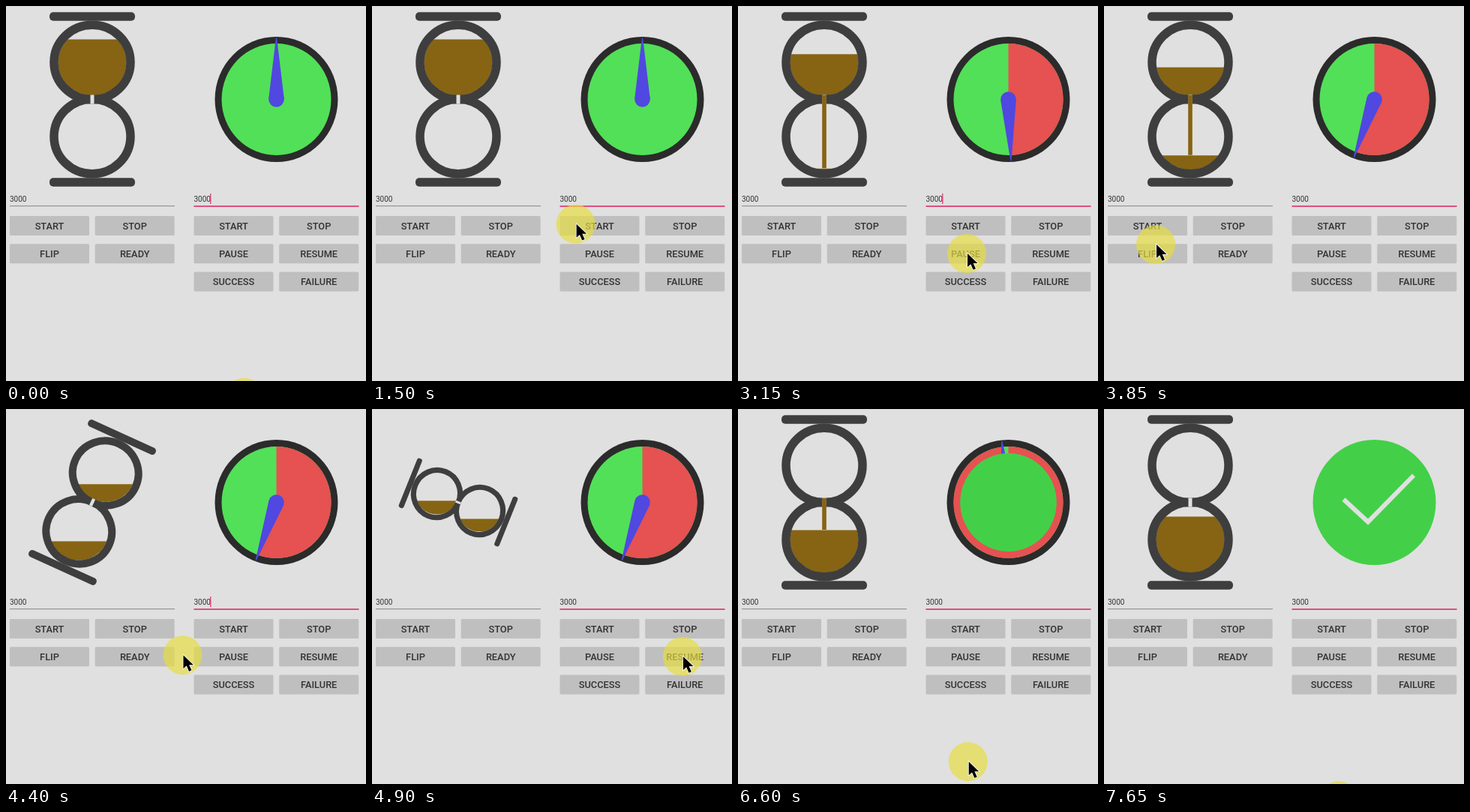
Recreate the animation shown at these times as an HTML page with a canvas. Size 480 by 500 pixels, loop 7.8 s.

```html
<!DOCTYPE html>
<html>
<head>
<meta charset="utf-8">
<style>
html, body { margin: 0; width: 100%; height: 100%; overflow: hidden; background: #e0e0e0; }
canvas { display: block; }
</style>
</head>
<body>
<canvas id="stage" width="480" height="500"></canvas>
<script>
const ctx = document.getElementById('stage').getContext('2d');
const LOOP = 7800, STEP = 50, LAST = 7650;
const BG = '#e0e0e0', FRAME = '#3e3e3e', SAND = '#866414', PINK = '#e0507f';
const TAU = Math.PI * 2;

// Timeline in ms
const DIAL_START = 1670, DIAL_PAUSE = 3332, DIAL_RESUME = 5313;
const SAND_START = 2360, FLIP_START = 4260, FLIP_TIME = 1030, SAND_RESUME = 5420;
const SUCCESS = 6250, CHECK = 6800;
const FULL = 75, RATE = FULL / 3000, FALL = 720, DROP = 99;

// Pointer path: time, x, y
const path = [
  [0, 317, 522], [150, 312, 530], [800, 190, 530], [1000, 188, 420],
  [1250, 270, 290], [1600, 272, 291], [1720, 272, 291], [2130, 38, 292],
  [2330, 45, 294], [2450, 136, 313], [2900, 305, 330], [3330, 305, 330],
  [3750, 71, 320], [3850, 69, 318], [4270, 68, 321], [4550, 443, 337],
  [4800, 414, 330], [5250, 413, 330], [5350, 385, 354], [5650, 298, 365],
  [5950, 296, 364], [6280, 296, 365], [6800, 312, 522], [7800, 313, 522]
];

const clamp = (v, lo = 0, hi = 1) => Math.min(hi, Math.max(lo, v));
const smooth = u => u * u * (3 - 2 * u);

function pointerAt(t) {
  const i = path.findIndex(p => p[0] > t);
  const [t0, x0, y0] = path[i - 1], [t1, x1, y1] = path[i];
  const u = smooth((t - t0) / (t1 - t0));
  return [x0 + (x1 - x0) * u, y0 + (y1 - y0) * u];
}

function rect(x, y, w, h, color) {
  ctx.fillStyle = color;
  ctx.fillRect(x, y, w, h);
}

function round(x, y, w, h, r, color) {
  ctx.fillStyle = color;
  ctx.beginPath();
  ctx.roundRect(x, y, w, h, r);
  ctx.fill();
}

function oval(x, y, rx, ry, color) {
  ctx.fillStyle = color;
  ctx.beginPath();
  ctx.ellipse(x, y, rx, ry, 0, 0, TAU);
  ctx.fill();
}

function text(str, x, y, font, align) {
  ctx.font = font + ' Roboto, sans-serif';
  ctx.textAlign = align;
  ctx.fillStyle = '#333';
  ctx.fillText(str, x, y);
}

// Sand heights in the upper and lower bulb, and the ends of the stream
function sandAt(t) {
  let top, bottom, from = 119, to = 119;
  const before = Math.min(t, FLIP_START) - SAND_START;
  top = FULL - RATE * Math.max(0, before);
  bottom = RATE * Math.max(0, before - FALL);
  if (t >= FLIP_START + FLIP_TIME) {
    const run = Math.max(0, t - SAND_RESUME);
    const left = bottom;
    bottom = Math.min(FULL, top + RATE * run);
    top = Math.max(0, left - RATE * run);
    const dry = run - left / RATE;
    if (run > 0) {
      to = 218 - bottom;
      from = Math.min(to, 119 + Math.max(0, dry) / FALL * DROP);
    }
  } else if (before > 0 && t < FLIP_START) {
    to = Math.min(218 - bottom, 119 + before / FALL * DROP);
  }
  return { top, bottom, from, to };
}

function bulb(y, height, angle) {
  ctx.save();
  ctx.translate(0, y);
  ctx.rotate(-angle);
  ctx.beginPath();
  ctx.ellipse(0, 0, 45.5, 44.5, 0, 0, TAU);
  ctx.clip();
  rect(-50, 44.5 - height, 100, height, SAND);
  ctx.restore();
  ctx.strokeStyle = FRAME;
  ctx.lineWidth = 11.5;
  ctx.beginPath();
  ctx.ellipse(0, y, 51, 49.8, 0, 0, TAU);
  ctx.stroke();
}

function hourglass(t) {
  const { top, bottom, from, to } = sandAt(t);
  const u = clamp((t - FLIP_START) / FLIP_TIME) % 1;
  const angle = u * Math.PI, scale = 0.5 + Math.abs(u - 0.5);
  ctx.save();
  ctx.translate(115, 124.5);
  ctx.rotate(angle);
  ctx.scale(scale, scale);
  for (const y of [-110.5, 110.5]) round(-57, y - 5.7, 114, 11.4, 5, FRAME);
  bulb(-49.5, top, angle);
  bulb(49.5, bottom, angle);
  rect(-2.5, -6, 5, 12, BG);
  ctx.restore();
  if (to > from) rect(112.2, from, 5.6, to - from, SAND);
}

function dialAngle(t) {
  const run = clamp(t - DIAL_START, 0, DIAL_PAUSE - DIAL_START) + Math.max(0, t - DIAL_RESUME);
  return Math.min(1, run / 3000) * TAU;
}

function dial(t) {
  const a = dialAngle(t);
  ctx.save();
  ctx.translate(360.5, 124.5);
  const grow = smooth(clamp((t - SUCCESS) / 500));
  if (grow < 1) {
    oval(0, 0, 82, 83.5, '#2b2b2b');
    oval(0, 0, 73, 74.5, '#52e058');
    ctx.fillStyle = '#e65151';
    ctx.beginPath();
    ctx.moveTo(0, 0);
    ctx.ellipse(0, 0, 73, 74.5, 0, -Math.PI / 2, a - Math.PI / 2);
    ctx.fill();
    ctx.save();
    ctx.rotate(a);
    oval(0, 0, 10.3, 10.3, '#5048e0');
    ctx.beginPath();
    ctx.moveTo(-10.3, -1);
    ctx.lineTo(-0.6, -82);
    ctx.lineTo(0.6, -82);
    ctx.lineTo(10.3, -1);
    ctx.fill();
    ctx.restore();
  }
  if (grow > 0) oval(0, 0, 82 * grow, 83.5 * grow, '#43d048');
  const drawn = clamp((t - CHECK) / 550) * 131;
  if (drawn > 0) {
    const first = Math.min(1, drawn / 44), second = clamp((drawn - 44) / 87);
    ctx.strokeStyle = BG;
    ctx.lineWidth = 6;
    ctx.beginPath();
    ctx.moveTo(-41, -4);
    ctx.lineTo(-41 + 32.5 * first, -4 + 30 * first);
    if (second > 0) ctx.lineTo(-8.5 + 61 * second, 26 - 62 * second);
    ctx.stroke();
  }
  ctx.restore();
}

function controls(t) {
  const panels = [
    [5, ['START', 'STOP', 'FLIP', 'READY']],
    [250.5, ['START', 'STOP', 'PAUSE', 'RESUME', 'SUCCESS', 'FAILURE']]
  ];
  for (const [x, labels] of panels) {
    text('3000', x, 261, '10px', 'left');
    labels.forEach((label, i) => {
      const bx = x + (i % 2) * 113.7, by = 280 + (i >> 1) * 37.2;
      round(bx, by, 106, 26, 1.5, '#bfbfbf');
      text(label, bx + 53, by + 17.7, '500 12.8px', 'center');
    });
  }
  rect(5, 266, 220, 1.2, '#949494');
  rect(250.5, 266, 220, 2, PINK);
  if (t % 1000 < 450) rect(272, 250, 1.5, 14, PINK);
}

function pointer(t) {
  const [x, y] = pointerAt(t);
  oval(x, y, 26, 26, 'rgba(230,222,64,0.68)');
  ctx.save();
  ctx.translate(x + 1, y);
  ctx.beginPath();
  for (const [px, py] of [[0, 0], [0, 18], [4.3, 14.2], [7.6, 21.8], [11, 20.2], [7.7, 13], [13.5, 13]])
    ctx.lineTo(px, py);
  ctx.closePath();
  ctx.strokeStyle = '#fff';
  ctx.lineWidth = 1.6;
  ctx.stroke();
  ctx.fillStyle = '#000';
  ctx.fill();
  ctx.restore();
}

function draw(now) {
  const t = Math.min(LAST, Math.floor((now % LOOP) / STEP) * STEP);
  rect(0, 0, 480, 500, BG);
  rect(0, 0, 480, 1, '#d8d8d8');
  hourglass(t);
  dial(t);
  controls(t);
  pointer(t);
}

const origin = performance.now();
function tick() {
  draw(performance.now() - origin);
  requestAnimationFrame(tick);
}
tick();
</script>
</body>
</html>
```
